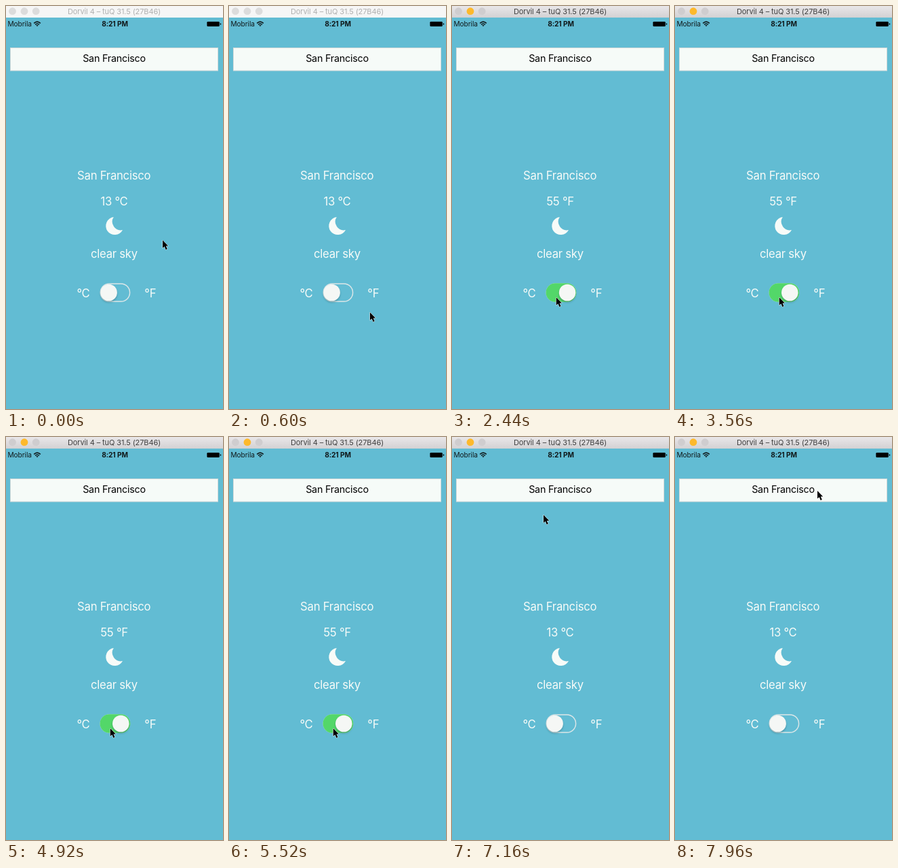
Animation of 320x592 px, one loop 8000 ms. Source, as an HTML page:

```html
<!DOCTYPE html>
<html lang="en">
<head>
<meta charset="utf-8">
<title>Weather</title>
<style>
  html, body { margin: 0; width: 100%; height: 100%; overflow: hidden; background: #62bcd3; }
  svg { display: block; width: 100vw; height: 100vh; }
  text { font-family: Inter, Roboto, sans-serif; text-anchor: middle; }
  .label { font-size: 16.7px; letter-spacing: -.015em; fill: #f7fbf8; }
  .status { font-size: 10.2px; letter-spacing: -.01em; fill: #10181a; }
</style>
</head>
<body>
<svg viewBox="0 0 320 592">
  <defs>
    <linearGradient id="chrome" x1="0" y1="0" x2="0" y2="1">
      <stop offset="0" stop-color="#e9e7e9"/>
      <stop offset="1" stop-color="#d3d1d3"/>
    </linearGradient>
    <filter id="soft" x="-50%" y="-50%" width="200%" height="200%">
      <feGaussianBlur stdDeviation="1.6"/>
    </filter>
  </defs>
  <rect width="320" height="592" fill="#62bcd3"/>

  <rect id="bar" width="320" height="17"/>
  <circle id="close" cx="9.5" cy="7.7" r="5.4"/>
  <circle id="mini" cx="27" cy="7.7" r="5.4"/>
  <circle id="zoom" cx="44.2" cy="7.7" r="5.4"/>
  <text id="title" x="159.5" y="12" font-size="11" letter-spacing="-.1">Dorvil 4 – tuQ 31.5 (27B46)</text>

  <text class="status" x="2.5" y="30" style="text-anchor:start">Mobrila</text>
  <g fill="none" stroke="#10181a" stroke-width="1.6">
    <path d="M41.2 25.3Q46 20.8 50.8 25.3M43.1 27.4Q46 24.6 48.9 27.4"/>
    <path d="M44.4 28.4Q46 27 47.6 28.4L46 30Z" fill="#10181a" stroke="none"/>
  </g>
  <text class="status" x="160.5" y="30" font-weight="700">8:21 PM</text>
  <rect x="296.4" y="22.9" width="18.4" height="7.2" rx="1.4" fill="#000"/>
  <path d="M315.8 25v3q1.4-.4 1.4-1.5t-1.4-1.5Z" fill="#000"/>

  <rect x="6.5" y="61.5" width="306" height="33.5" fill="#f6fbf8" stroke="#cfd8d8" stroke-width="1"/>
  <text x="159.5" y="82" font-size="14.3" letter-spacing="-.21" fill="#000">San Francisco</text>

  <text class="label" x="159.2" y="255">San Francisco</text>
  <text class="label" id="temp" x="159.5" y="293"></text>
  <path d="M158.8 310A13.1 13.1 0 1 0 172 329A12.5 12.5 0 0 1 158.8 310Z" fill="#f7fbf8"/>
  <text class="label" x="159.4" y="369.5">clear sky</text>
  <text class="label" x="114" y="427.5">°C</text>
  <text class="label" x="212.8" y="427.5">°F</text>

  <rect x="139.2" y="408" width="43.4" height="26" rx="13" fill="none" stroke="#dde7e8" stroke-width="1.4"/>
  <rect id="track" x="138.5" y="407.3" width="44.8" height="27.4" rx="13.7" fill="#53d769"/>
  <g id="knob">
    <circle cy="423.2" r="12" fill="#23515c" opacity=".4" filter="url(#soft)"/>
    <circle cy="421" r="12.3" fill="#f5f7f5"/>
  </g>

  <path id="cursor" d="M0 0V11.6L2.7 9.2L4.7 14L6.8 13.1L4.8 8.5H8.2Z"
        fill="#000" stroke="#fff" stroke-width=".9" stroke-linejoin="round" paint-order="stroke"/>
</svg>
<script>
const LOOP = 8000, FOCUS = 1680, ON = 2120, OFF = 5880;
const $ = id => document.getElementById(id);
const set = (id, name, value) => $(id).setAttribute(name, value);

// Pointer stops: time, x, y
const stops = [
  [0, 231, 344], [240, 234, 372], [600, 208, 450], [880, 180, 446],
  [1240, 153.7, 428], [6700, 153.7, 428], [6780, 152.5, 415],
  [7000, 137, 170], [7160, 135, 114.5], [7280, 136, 113], [7900, 210, 79], [8000, 210, 79]
];

function slope(i, axis) {
  if (!i || i === stops.length - 1) return 0;
  const [a, b, c] = stops.slice(i - 1, i + 2);
  const p = (b[axis] - a[axis]) / (b[0] - a[0]);
  const q = (c[axis] - b[axis]) / (c[0] - b[0]);
  return p * q > 0 ? 2 * p * q / (p + q) : 0;
}

// Monotone cubic through the stops
function pointer(t, axis) {
  let i = 0;
  while (i < stops.length - 2 && t >= stops[i + 1][0]) i++;
  const a = stops[i], b = stops[i + 1], d = b[0] - a[0], u = (t - a[0]) / d;
  const s = u * u * (3 - 2 * u);
  return a[axis] * (1 - s) + b[axis] * s
    + d * u * (1 - u) * ((1 - u) * slope(i, axis) - u * slope(i + 1, axis));
}

const clamp = v => Math.min(1, Math.max(0, v));

// Knob travel with a slight overshoot before it settles
function travel(ms) {
  const u = clamp(ms / 260);
  const bump = Math.sin(Math.PI * clamp((ms - 200) / 260));
  return u * u * (3 - 2 * u) + .045 * bump;
}

function draw(t) {
  const active = t >= FOCUS, on = t >= ON && t < OFF;
  set('bar', 'fill', active ? 'url(#chrome)' : '#f6f6f6');
  set('close', 'fill', active ? '#cfcdcf' : '#dcdcdc');
  set('zoom', 'fill', active ? '#cfcdcf' : '#dcdcdc');
  set('mini', 'fill', active ? '#fdb92c' : '#dcdcdc');
  set('title', 'fill', active ? '#404040' : '#b0b0b0');
  $('temp').textContent = on ? '55 °F' : '13 °C';

  const k = travel(t - ON) - travel(t - OFF);
  set('knob', 'transform', `translate(${151.6 + 17.7 * k})`);
  set('track', 'opacity', clamp(k));
  set('cursor', 'transform', `translate(${pointer(t, 1)} ${pointer(t, 2)})`);
}

const start = performance.now();
function tick() {
  draw((performance.now() - start) % LOOP);
  requestAnimationFrame(tick);
}
tick();
</script>
</body>
</html>
```
